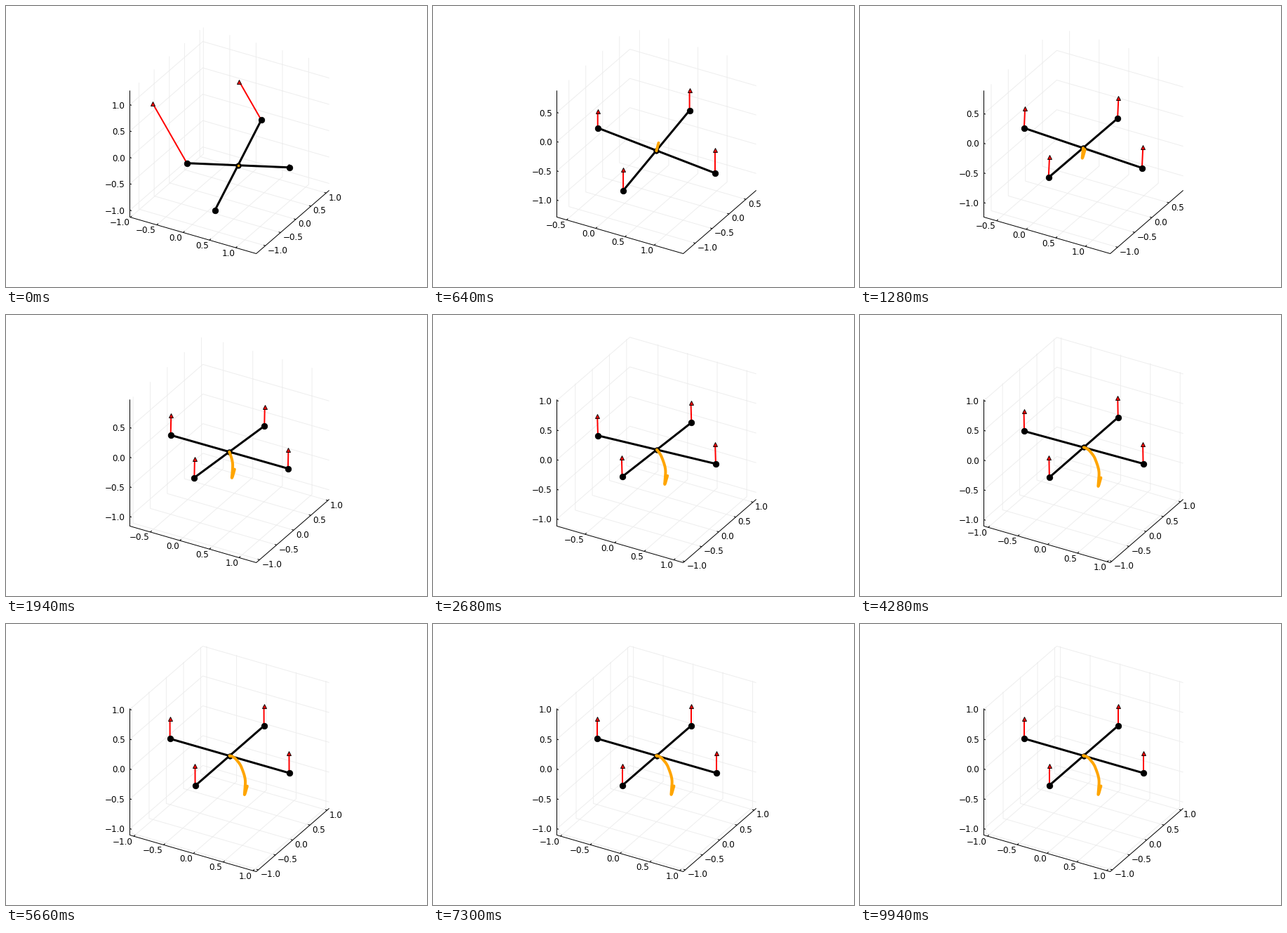
These frames come from a looping animation (600 by 400 pixels, 10000 ms). A matplotlib script:

```python
import numpy as np
import matplotlib.pyplot as plt
from matplotlib.animation import FuncAnimation

W, H, DPI = 600, 400, 100
FRAMES, STEP = 500, 20
PX = 72 / DPI          # one pixel in points
HOVER = 0.33

# Screen directions of the plot cube's edges, and its lower left corner
CORNER = np.array([176.5, 300.5])
SIDE = 208.0
AXES = SIDE * np.array([[0.866, 0.25], [0.5, -0.433], [0.0, -0.866]])


def smooth(keys, values, t):
    """Cubic Hermite curve through the keys, held after the last one."""
    keys, values = np.array(keys), np.array(values)
    slope = np.gradient(values, keys)
    slope[-1] = 0
    t = np.clip(t, keys[0], keys[-1])
    i = np.clip(np.searchsorted(keys, t, "right") - 1, 0, len(keys) - 2)
    h = keys[i + 1] - keys[i]
    u = (t - keys[i]) / h
    return ((1 + 2 * u) * (1 - u) ** 2 * values[i]
            + u * (1 - u) ** 2 * h * slope[i]
            + u * u * (3 - 2 * u) * values[i + 1]
            + u * u * (u - 1) * h * slope[i + 1])


time = np.arange(FRAMES) * STEP / 1000

# Flight path and attitude
KEYS = [0, .3, .64, .85, 1.1, 1.4, 1.94, 2.68, 3.4, 4.28, 5.4, 7]
X = [.35, .375, .39, .382, .365, .328, .2255, .10, .03, -.008, -.006, 0]
Y = [-.10, -.175, -.235, -.236, -.193, -.118, -.038, .022, .03, .018, .003, 0]
Z = [-.355, -.378, -.407, -.42, -.362, -.268, -.1275, -.049, -.02, -.009, -.003, 0]
ROLL = [.392, .29, .198, .12, .04, -.02, -.0585, -.04, -.015, .003, .002, 0]
PITCH = [-.242, .04, .11, .10, .07, .03, -.014, -.053, -.038, -.0155, -.003, 0]
pos = np.stack([smooth(KEYS, v, time) for v in (X, Y, Z)], axis=1)
roll, pitch = smooth(KEYS, ROLL, time), smooth(KEYS, PITCH, time)

# Yaw and the thrust of the rotors on +x, +y, -x, -y
SLOW = [0, .3, .64, 1.1, 1.94, 2.68, 4.28, 6]
yaw = smooth(SLOW, [0, .01, .02, 0, -.015, -.006, 0, 0], time)
thrust = np.stack([smooth(SLOW, v + [HOVER], time) for v in (
    [.03, .38, .469, .38, .31, .316, .327],
    [.946, .52, .41, .36, .315, .318, .327],
    [1.458, .55, .33, .33, .322, .32, .328],
    [0, .34, .42, .37, .305, .318, .327],
)], axis=1)


def body_axes(k):
    cr, sr = np.cos(roll[k]), np.sin(roll[k])
    cp, sp = np.cos(pitch[k]), np.sin(pitch[k])
    cy, sy = np.cos(yaw[k]), np.sin(yaw[k])
    bx = np.array([cp * cy, cp * sy, -sp])
    by = np.array([cy * sp * sr - sy * cr, sy * sp * sr + cy * cr, cp * sr])
    return bx, by, np.cross(bx, by)


def on_screen(unit):
    """Cube coordinates (0 to 1) to pixels."""
    return CORNER + np.asarray(unit, float) @ AXES


def joined(paths):
    """Separate polylines as one line with gaps."""
    gap = np.full((1, 2), np.nan)
    if not paths:
        return gap.T
    return np.concatenate([part for p in paths for part in (on_screen(p), gap)]).T


fig = plt.figure(figsize=(W / DPI, H / DPI), dpi=DPI, facecolor="white")
ax = fig.add_axes([0, 0, 1, 1])
ax.set_xlim(0, W)
ax.set_ylim(H, 0)
ax.axis("off")


def line(color, width, z, cap="butt"):
    return ax.plot([], [], color=color, lw=width * PX, zorder=z,
                   solid_capstyle=cap, solid_joinstyle="round")[0]


def dots(marker, size, fill, edge, z):
    return ax.plot([], [], ls="none", marker=marker, ms=size * PX, mfc=fill,
                   mec=edge, mew=0.9 * PX, zorder=z, snap=False)[0]


grid = line("#eeeeee", 1, 1)
frame_line = line("black", 1, 2)
ticks = line("black", 1, 2)
forces = line("red", 2, 3)
tips = dots("^", 6.4, "red", "black", 4)
arms = line("black", 3, 5)
hubs = dots("o", 8.4, "black", "black", 6)
core = dots("o", 7.4, "black", "black", 6)
trail = line("orange", 4, 7, "round")
dot = dots("o", 2.6, "orange", "orange", 7)

frame_line.set_data(*joined([[(0, 0, 1), (0, 0, 0), (1, 0, 0), (1, 1, 0)]]))

# Per axis: text alignment and offset of the label's baseline from its tick
LABELS = [("right", -1, 11.6), ("left", 3, 10.5), ("right", -6.5, 4.9)]
labels = [[ax.text(0, 0, "", ha=ha, va="baseline", family="DejaVu Sans",
                   size=12 * PX, color="black") for _ in range(6)]
          for ha, _, _ in LABELS]


def tick_values(lo, hi):
    return np.arange(np.ceil(lo * 2), np.floor(hi * 2) + 1) / 2


def draw_axes(low, size):
    grid_paths, tick_paths = [], []
    for n, (_, dx, dy) in enumerate(LABELS):
        values = tick_values(low[n], low[n] + size)[:6]
        for text in labels[n][len(values):]:
            text.set_text("")
        for value, text in zip(values, labels[n]):
            f = (value - low[n]) / size
            if n == 0:
                start, inner = (f, 0, 0), (f, 0.02, 0)
                grid_paths.append([start, (f, 1, 0), (f, 1, 1)])
            elif n == 1:
                start, inner = (1, f, 0), (0.985, f, 0)
                grid_paths.append([start, (0, f, 0), (0, f, 1)])
            else:
                start, inner = (0, 0, f), (0.014, 0, f)
                grid_paths.append([start, (0, 1, f), (1, 1, f)])
            tick_paths.append([start, inner])
            x, y = on_screen(start)
            text.set_position((x + dx, y + dy))
            text.set_text(f"{value + 0.0:.1f}".replace("-", "\u2212"))
    grid.set_data(*joined(grid_paths))
    ticks.set_data(*joined(tick_paths))


def update(k):
    bx, by, bz = body_axes(k)
    ends = pos[k] + np.array([bx, by, -bx, -by])
    heads = ends + thrust[k][:, None] * bz

    # Equal scale on all axes, centred on the data with a small margin
    path = pos[:k + 1]
    data = np.concatenate([ends, heads, path])
    lo, hi = data.min(axis=0), data.max(axis=0)
    size = 1.06 * (hi - lo).max()
    low = (lo + hi - size) / 2

    def unit(p):
        return (p - low) / size

    draw_axes(low, size)
    e, h = unit(ends), unit(heads)
    forces.set_data(*joined([[a, b] for a, b in zip(e, h)]))
    arms.set_data(*joined([e[[0, 2]], e[[1, 3]]]))
    tips.set_data(*on_screen(h).T)
    hubs.set_data(*on_screen(e).T)
    centre = on_screen(unit(path[-1:])).T
    core.set_data(*centre)
    dot.set_data(*centre)
    trail.set_data(*on_screen(unit(path)).T)
    return []


anim = FuncAnimation(fig, update, frames=FRAMES, interval=STEP,
                     init_func=lambda: update(0), repeat=True, repeat_delay=0)
plt.show()
```
